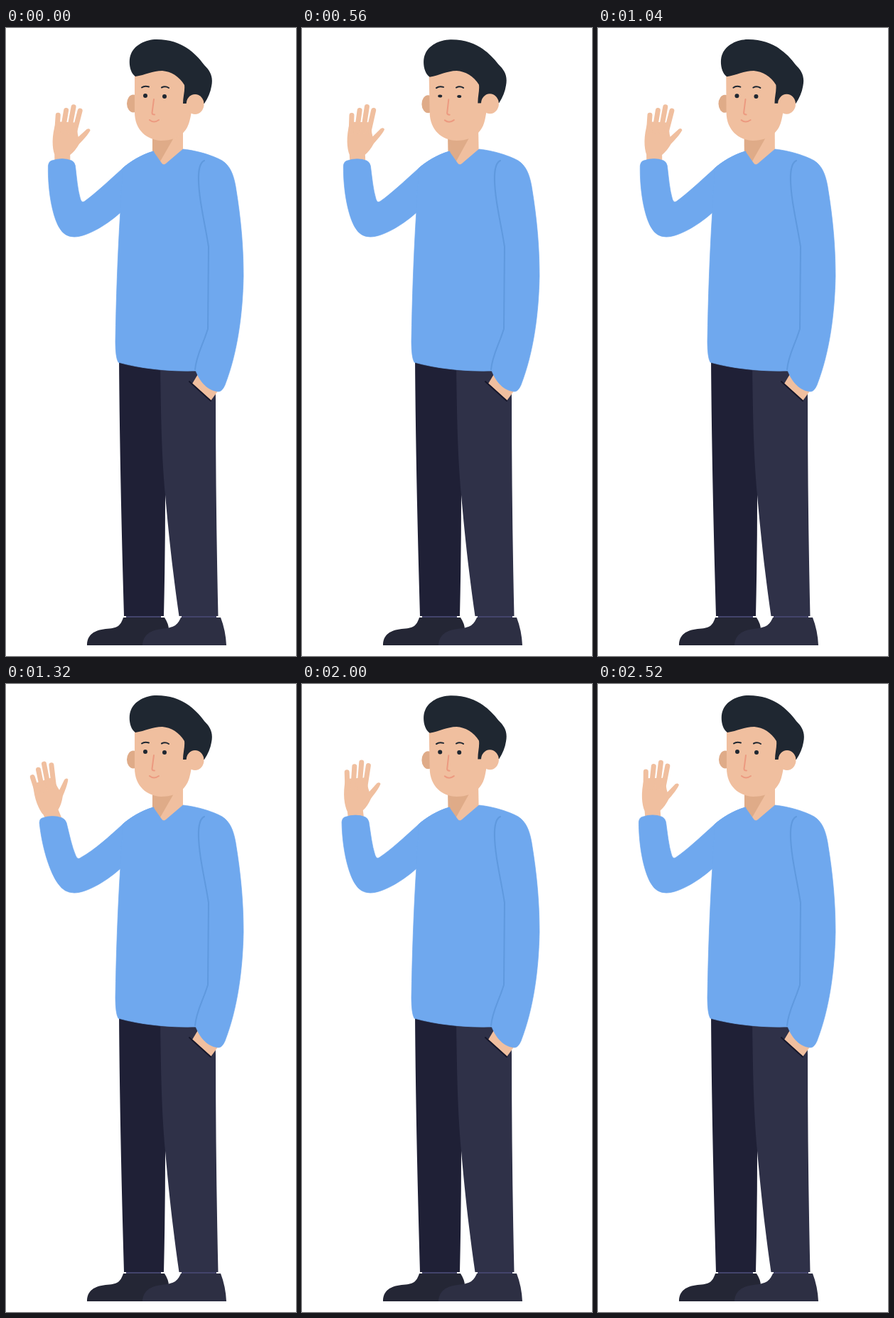
These frames come from a looping animation (408 by 881 pixels, 2560 ms). An HTML page:

```html
<!DOCTYPE html>
<html lang="en">
<head>
<meta charset="utf-8">
<title>Waving man</title>
<style>
  html, body { margin: 0; height: 100%; overflow: hidden; background: #fff; }
  svg { display: block; width: 100%; height: 100%; }
  .skin { fill: #f0bf9f; }
  .shade { fill: #dfab88; }
  .hair { fill: #1f2731; }
  .wool { fill: #6fa8ee; stroke: #6fa8ee; stroke-width: .7; }
  .line { fill: none; stroke-width: 2; stroke-linecap: round; stroke-linejoin: round; }
  .finger { stroke: #f0bf9f; stroke-width: 7; }
</style>
</head>
<body>
<svg viewBox="0 0 408 881">
  <g id="legs">
    <path fill="#43446b" d="M169 822H218V828H169ZM247 822H296V828H247Z"/>
    <path fill="#242635" d="M165 827H223Q229 836 229 844V866H114C114 851 124 845 140 843C157 842 161 839 165 827Z"/>
    <path fill="#2d2f43" d="M246 827H302Q309 845 310 866H192C193 851 203 845 219 843C237 841 241 838 246 827Z"/>
    <path fill="#1f2036" d="M159 460H230L224 660Q224 740 222 825H166Q160 620 159 460Z"/>
    <path fill="#2f3148" d="M217 470H294L295 520Q295 670 298.500 825H243.500C234 760 228 700 224 655C219 600 218 550 217 470Z"/>
    <path class="skin" d="M271 484L262 499L288 523L299 508Z"/>
    <path class="line" stroke="#15162a" d="M258 496L288 523"/>
  </g>

  <g id="head">
    <path class="skin" d="M206 140V176L222 196L249 174V130Z"/>
    <path class="shade" d="M206 150V174L217 187L236 154Z"/>
    <ellipse class="shade" cx="179" cy="106" rx="9" ry="12.500"/>
    <path class="skin" d="M181 60H262V112C259 128 258 137 251 145C244 154 232 158 218 158C198 157 181 143 181 118Z"/>
    <path class="hair" d="M182 68C173 62 172 44 176 36C181 24 196 16 212 16C245 16 265 33 279 52C287 60 292 68 289 82Q287 94 279 106H249C249 96 252 88 251 80C244 68 232 61 220 60C206 60 196 66 182 68Z"/>
    <ellipse class="skin" cx="266" cy="107" rx="12.500" ry="14"/>
    <g class="hair">
      <ellipse class="eye" cx="196" cy="95" rx="3"/>
      <ellipse class="eye" cx="223" cy="96" rx="3"/>
    </g>
    <path class="line" stroke="#1f2731" d="M191 83.500Q195 80.500 201 82.500M219 83.500Q224 81 229 84"/>
    <path class="line" stroke="#ec9a80" d="M208 100L205.500 119Q205.500 121.500 209 121.500M202 129Q208 134 215 129"/>
  </g>

  <g id="hand">
    <path class="skin" d="M69 192V177C66 168 65 152 72 131L102 133Q101 146 103 153L115 142.500Q119 140.500 120 144C117 150 109 158 104 163Q98 173 91 178V192Z"/>
    <path class="line finger" d="M73 145L75 122M81 145L86.500 115.500M90 145L97 111M98 145L106 116.500"/>
  </g>
  <path id="arm" class="wool"/>

  <g id="sweater">
    <path class="wool" d="M207 173L219 190Q222 193.500 225.500 190L249 170C268 172 289 178 304 186C315 193 320 205 323 222C331 270 334 310 334 348C333 400 326 455 308 501Q304 510 299 510C287 509 275 501 267 481C230 482 190 478 158 469Q154 462 154 440C155 380 157 320 161 256L164 197C174 188 190 178 207 173Z"/>
    <path class="line" stroke="#5f99de" d="M279 186C268 191 270 218 274 245C278 270 282 287 285 307L284 422C277 445 268 458 266 479"/>
  </g>
</svg>
<script>
const LOOP = 2560, WAVES = 5, SWAYS = 2, WAVE_DELAY = 36;
const BLINK_AT = 600;
const ELBOW_Y = 293, WRIST_Y = 185;

// Points written "x,y" bend with the forearm; the others stay put.
const ARM = "M208 173C190 178 174 188 164 197C145 214 126 232 111,243Q107,246 105,240C101,226 100,210 98,193Q97,188 93,186Q80,181 65,186Q61,187 60,193C59,230 66,265 75,280Q82 293 96 293C115 293 145 274 163 257L200 250Z";

const $ = id => document.getElementById(id);

// Goes from 0 to 1 and back, the given number of times per loop.
const cycle = (t, times) => (1 - Math.cos(2 * Math.PI * times * t / LOOP)) / 2;

function bend(x, y, reach) {
  const lift = reach * (ELBOW_Y - y) / (ELBOW_Y - WRIST_Y);
  return [x - 14 * lift, y + 2 * lift];
}

function draw(t) {
  const sway = cycle(t, SWAYS);
  // The wave narrows as the head leans away.
  const reach = .13 * sway + (1 - .25 * sway) * cycle(t - WAVE_DELAY, WAVES);
  const open = Math.min(1, .1 + Math.abs(t - BLINK_AT) / 70);

  $("arm").setAttribute("d", ARM.replace(/(\d+),(\d+)/g, (_, x, y) => bend(+x, +y, reach).join(" ")));
  $("hand").setAttribute("transform", `translate(${bend(0, WRIST_Y, reach)
    .map((v, i) => v - i * WRIST_Y)}) rotate(${-22.5 * reach} 80 ${WRIST_Y})`);
  $("head").setAttribute("transform", `rotate(${-1.1 * sway} 222 192)`);
  for (const eye of document.querySelectorAll(".eye")) eye.setAttribute("ry", 3 * open);
}

const start = performance.now();
(function tick() {
  draw((performance.now() - start) % LOOP);
  requestAnimationFrame(tick);
})();
</script>
</body>
</html>
```
